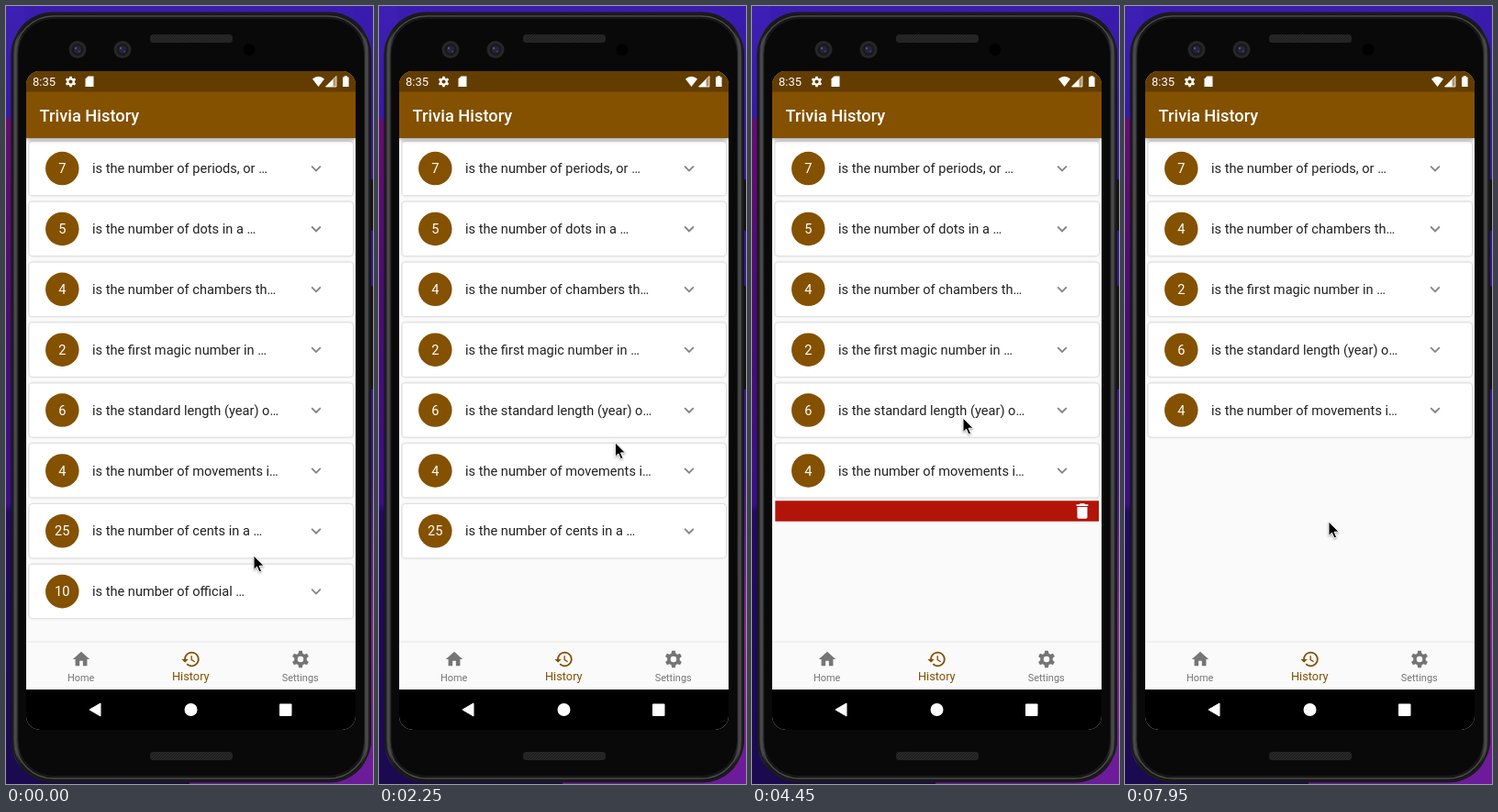
Animation of 400 by 848 pixels, one loop 8000 ms. Source, as an HTML page:

```html
<!DOCTYPE html>
<html lang="en">
<head>
<meta charset="utf-8">
<title>Trivia History</title>
<style>
  html, body { margin: 0; width: 100%; height: 100%; overflow: hidden; background: #000; }
  svg { display: block; }
  #stage { width: 400px; height: 848px; }
  text { font-family: Roboto, sans-serif; font-size: 14.6px; fill: #212121; }
  .mid { text-anchor: middle; }
  .medium { font-weight: 500; }
  .title { font-size: 18.27px; font-weight: 500; }
  .button { font-size: 12.8px; font-weight: 500; fill: #845100; }
  .small { font-size: 10.96px; fill: #757575; }
  .card { filter: drop-shadow(0 .9px .9px rgba(0,0,0,.33)); }
  .bar { filter: drop-shadow(0 2px 2.5px rgba(0,0,0,.35)); }
  .sheet { filter: drop-shadow(0 9px 13px rgba(0,0,0,.38)); }
  .pointer { filter: drop-shadow(0 1px 1px rgba(0,0,0,.35)); }
</style>
</head>
<body>
<svg id="stage" viewBox="0 0 400 848">
  <defs>
    <linearGradient id="leftWall" x2="0" y2="1">
      <stop offset="0" stop-color="#3d20b4"/><stop offset=".143" stop-color="#3819a6"/>
      <stop offset=".146" stop-color="#640e70"/><stop offset=".4" stop-color="#480d72"/>
      <stop offset=".64" stop-color="#3a1087"/><stop offset=".65" stop-color="#220a60"/>
      <stop offset="1" stop-color="#1b0a50"/>
    </linearGradient>
    <linearGradient id="rightWall" x2="0" y2="1">
      <stop offset="0" stop-color="#391cae"/><stop offset=".3" stop-color="#32169a"/>
      <stop offset=".6" stop-color="#3a148f"/><stop offset=".8" stop-color="#85208f"/>
      <stop offset="1" stop-color="#6b1b9b"/>
    </linearGradient>
    <linearGradient id="rim">
      <stop offset="0" stop-color="#101010"/><stop offset=".012" stop-color="#4a4a4a"/>
      <stop offset=".03" stop-color="#161616"/><stop offset=".97" stop-color="#161616"/>
      <stop offset=".988" stop-color="#4a4a4a"/><stop offset="1" stop-color="#101010"/>
    </linearGradient>
    <pattern id="mesh" width="3" height="3" patternUnits="userSpaceOnUse">
      <rect width="3" height="3" fill="#202020"/><path d="M0 3L3 0" stroke="#323232" stroke-width=".7"/>
    </pattern>
    <clipPath id="screen"><rect x="22" y="71" width="359" height="718" rx="15"/></clipPath>

    <symbol id="home" viewBox="0 0 24 24"><path d="M10 20v-6h4v6h5v-8h3L12 3 2 12h3v8z"/></symbol>
    <symbol id="history" viewBox="0 0 24 24">
      <path d="M13 3c-4.97 0-9 4.03-9 9H1l3.89 3.89.07.14L9 12H6c0-3.87 3.13-7 7-7s7 3.13 7 7-3.13 7-7 7c-1.93 0-3.68-.79-4.94-2.06l-1.42 1.42C8.27 19.99 10.51 21 13 21c4.97 0 9-4.03 9-9s-4.03-9-9-9zm-1 5v5l4.28 2.54.72-1.21-3.5-2.08V8z"/>
    </symbol>
    <symbol id="gear" viewBox="0 0 24 24">
      <circle cx="12" cy="12" r="5.5" fill="none" stroke="currentColor" stroke-width="3.9"/>
      <g id="teeth"></g>
    </symbol>
    <symbol id="trash" viewBox="0 0 24 24">
      <path d="M6 19c0 1.1.9 2 2 2h8c1.1 0 2-.9 2-2V7H6zM19 4h-3.5l-1-1h-5l-1 1H5v2h14z"/>
    </symbol>
    <symbol id="more" viewBox="0 0 24 24"><path d="M16.59 8.59L12 13.17 7.41 8.59 6 10l6 6 6-6z"/></symbol>
  </defs>

  <!-- wallpaper and phone -->
  <rect width="200" height="848" fill="url(#leftWall)"/>
  <rect x="200" width="200" height="848" fill="url(#rightWall)"/>
  <path d="M20 0H380V20H20z" fill="#3a1db0"/>
  <rect x="396" y="189" width="4" height="56" rx="1.5" fill="#121212"/>
  <rect x="396" y="305" width="4" height="113" rx="1.5" fill="#121212"/>
  <rect x="5.5" y="6.5" width="392.5" height="840" rx="46" fill="url(#rim)"/>
  <rect x="7" y="8" width="389.5" height="837" rx="44.5" fill="none" stroke="#1b1b1d" stroke-width="2"/>
  <rect x="10" y="11" width="383.5" height="831" rx="42" fill="none" stroke="#4b4b4d" stroke-width="1.5"/>
  <rect x="13" y="13.5" width="377.5" height="826" rx="39" fill="#090909" stroke="#1a1a1a"/>
  <rect x="157" y="31" width="90" height="9" rx="3.5" fill="url(#mesh)"/>
  <rect x="157" y="813" width="90" height="9" rx="3.5" fill="url(#mesh)"/>
  <g id="lenses"></g>
  <circle cx="265" cy="47.500" r="6.500" fill="#010101"/>

  <!-- app -->
  <g clip-path="url(#screen)">
    <rect x="22" y="71" width="359" height="718" fill="#fafafa"/>
    <g id="list"></g>
    <rect class="bar" x="22" y="71" width="359" height="73" fill="#845100"/>
    <rect x="22" y="71" width="359" height="22.500" fill="#633d00"/>
    <text class="title" x="36.600" y="125.500" style="fill:#fff">Trivia History</text>

    <rect x="22" y="693" width="359" height="52" fill="#fafafa"/>
    <path d="M22 693H381" stroke="#e6e6e6"/>
    <g fill="#757575" color="#757575">
      <use href="#home" x="71" y="701" width="22" height="22"/>
      <use href="#gear" x="310" y="701" width="22" height="22"/>
      <use href="#history" x="190.500" y="701" width="22" height="22" fill="#845100"/>
    </g>
    <text class="small mid" x="81.700" y="735.500">Home</text>
    <text class="mid" x="201.300" y="735" style="font-size:12.8px;fill:#845100">History</text>
    <text class="small mid" x="320.700" y="735.500">Settings</text>

    <rect id="dim" x="22" y="71" width="359" height="674"/>
    <g id="dialog">
      <rect class="sheet" x="74" y="359" width="255" height="120" rx="3.700" fill="#fff"/>
      <text class="title" x="95.700" y="398.500">Are you sure</text>
      <text class="button mid" x="227" y="454.500">Yes</text>
      <text class="button mid" x="292.800" y="454.500">No</text>
    </g>

    <!-- system bars -->
    <g fill="#fff" color="#fff">
      <text x="29" y="87" style="font-size:13px;fill:#fff">8:35</text>
      <use href="#gear" x="63.500" y="75.500" width="14" height="14"/>
      <path d="M89.500 76.500H95.500V88H86.500V79.500z"/>
      <path d="M340.500 88L334 79.500Q340.500 74 347 79.500z"/>
      <path d="M360 76.500V88H348.500z" opacity=".45"/><path d="M356.500 80V88H348.500z"/>
      <path d="M360 76.500V88H348.500z" fill="none" stroke="#fff" stroke-width=".8"/>
      <path d="M367 77.500h1.700V76.300h3.200v1.200h1.700V88H367z"/>
      <rect x="22" y="745" width="359" height="44" fill="#000"/>
      <path d="M91 767L103 760V774z" stroke="#fff" stroke-linejoin="round"/>
      <circle cx="201.500" cy="767" r="7"/>
      <rect x="298" y="760.500" width="13.500" height="13.500" rx="1"/>
    </g>
  </g>
  <path id="pointer" class="pointer" d="M0 0v15.500l3.500-3.300 2.500 5.800 2.600-1.100-2.500-5.700h5z" stroke="#fff" stroke-width="1"/>
</svg>

<script>
const LOOP = 8000, SLOT = 65.86, WIDTH = 359;
const $ = id => document.getElementById(id);
const clamp = v => Math.max(0, Math.min(1, v));
const smooth = p => p * p * (3 - 2 * p);

// drag: time and card offset; ask: dialog opens; yes: dialog closes
const dismissals = {
  10: { drag: [[430, 0], [760, -300], [860, -WIDTH]], ask: 900, yes: 1950 },
  25: { drag: [[2830, 0], [3170, -290], [3280, -WIDTH]], ask: 3410, yes: 4262 },
  5: { drag: [[5390, 0], [5750, -304], [5840, -WIDTH]], ask: 5900, yes: 7000 }
};

const pointerPath = [
  [0, 270, 599], [120, 270, 599], [400, 318, 638], [780, 190, 640], [1000, 196, 636],
  [1400, 264, 506], [1700, 237, 449], [2050, 236, 448], [2700, 330, 570], [2820, 330, 571],
  [3200, 126, 570], [3500, 126, 570], [4050, 230, 449], [4500, 230, 449], [5200, 338, 243],
  [5380, 338, 244], [5750, 70, 253], [6000, 68, 254], [6600, 236, 445], [7100, 236, 445],
  [7700, 222, 562], [8000, 222, 562]
];

const facts = [
  [7, 'is the number of periods, or …'], [5, 'is the number of dots in a …'],
  [4, 'is the number of chambers th…'], [2, 'is the first magic number in …'],
  [6, 'is the standard length (year) o…'], [4, 'is the number of movements i…'],
  [25, 'is the number of cents in a …'], [10, 'is the number of official …']
];

function track(points, t, ease = p => p) {
  const next = points.findIndex(p => p[0] > t);
  if (next === 0) return points[0].slice(1);
  if (next < 0) return points[points.length - 1].slice(1);
  const a = points[next - 1], b = points[next];
  const p = ease((t - a[0]) / (b[0] - a[0]));
  return a.slice(1).map((v, i) => v + (b[i + 1] - v) * p);
}

// cubic-bezier(.25, .1, .25, 1)
function easeCurve(x) {
  const bez = (a, b, u) => 3 * a * u * (1 - u) ** 2 + 3 * b * u * u * (1 - u) + u ** 3;
  let lo = 0, hi = 1;
  for (let i = 0; i < 20; i++) {
    const u = (lo + hi) / 2;
    if (bez(.25, .25, u) < x) lo = u; else hi = u;
  }
  return bez(.1, 1, hi);
}

$('teeth').innerHTML = [0, 60, 120, 180, 240, 300].map(a =>
  `<path d="M10 2h4l.8 4.500h-5.600z" fill="currentColor" transform="rotate(${a} 12 12)"/>`).join('');

$('lenses').innerHTML = [78, 127].map(x => `<g transform="translate(${x} 47.500)">
  <circle r="9.500" fill="#272727"/><circle r="6.500" fill="#19191c"/><circle r="4" fill="#24243e"/>
  <circle cx="-2" cy="-1.500" r="1.200" fill="#55557c"/><circle cx="2" cy="2" r="1" fill="#45456b"/></g>`).join('');

$('list').innerHTML = facts.map(([number, label]) => `
  <svg class="slot" x="22" width="${WIDTH}" overflow="hidden"><g class="inner">
    <rect x="3.300" y="3.650" width="352.700" height="58.560" fill="#b31409"/>
    <use href="#trash" x="327" y="22" width="22" height="22" fill="#fff"/>
    <g class="slide">
      <rect width="${WIDTH}" height="${SLOT}" fill="#fafafa"/>
      <rect class="card" x="3.300" y="3.650" width="352.700" height="58.560" rx="3.650" fill="#fff"/>
      <circle cx="39.300" cy="33" r="18.270" fill="#845100"/>
      <text class="mid" x="39.300" y="38.200" style="fill:#fff">${number}</text>
      <text x="72" y="38.200">${label}</text>
      <use href="#more" x="305" y="22" width="22" height="22" fill="#858585"/>
    </g></g></svg>`).join('');

const rows = [...document.querySelectorAll('.slot')].map((slot, i) => ({
  slot,
  inner: slot.querySelector('.inner'),
  slide: slot.querySelector('.slide'),
  plan: dismissals[facts[i][0]]
}));

function render(t) {
  let top = 144.1, shown = 0;
  for (const { slot, inner, slide, plan } of rows) {
    let height = SLOT;
    if (plan) {
      height *= 1 - easeCurve(clamp((t - plan.yes - 120) / 180));
      if (t >= plan.yes + 300) height = 0;
      slide.setAttribute('transform', `translate(${track(plan.drag, t)[0]} 0)`);
      shown += clamp((t - plan.ask) / 150) - clamp((t - plan.yes) / 150);
    }
    slot.setAttribute('y', top);
    slot.setAttribute('height', height);
    slot.style.display = height ? 'block' : 'none';
    inner.setAttribute('transform', `translate(0 ${(height - SLOT) / 2})`);
    top += height;
  }
  $('dim').setAttribute('opacity', .54 * shown);
  $('dialog').setAttribute('opacity', smooth(clamp(shown)));
  $('pointer').setAttribute('transform', `translate(${track(pointerPath, t, smooth)})`);
}

const start = performance.now();
function frame() {
  render((performance.now() - start) % LOOP);
  requestAnimationFrame(frame);
}
frame();
</script>
</body>
</html>
```
